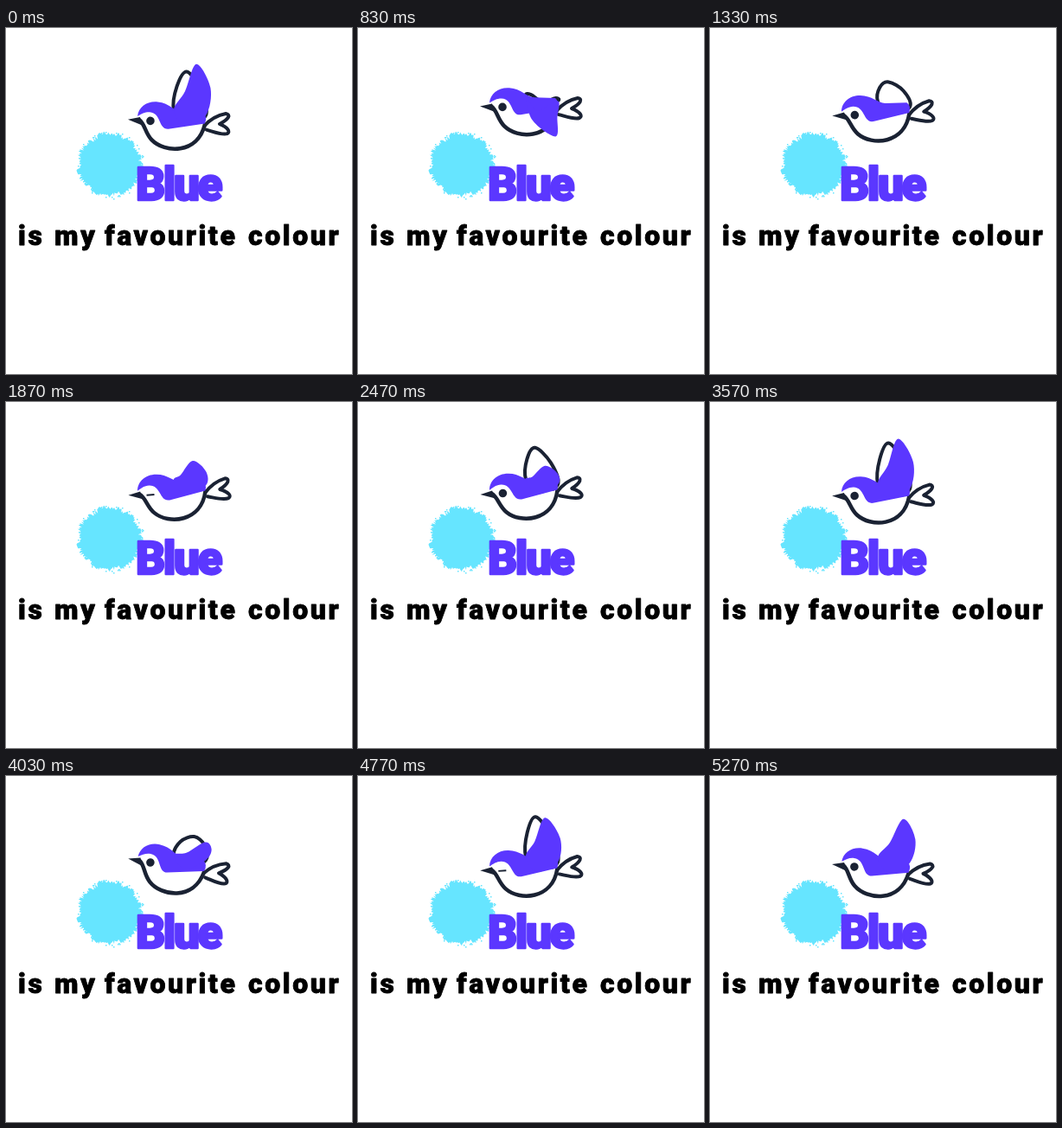
Recreate the animation shown at these times as an HTML page with a canvas. Size 400 px wide and 400 px high, loop 5.31 s.

```html
<!DOCTYPE html>
<html lang="en">
<head>
<meta charset="utf-8">
<title>Blue bird</title>
<style>
  html, body { margin: 0; width: 100%; height: 100%; overflow: hidden; background: #fff; }
  canvas { display: block; width: 400px; height: 400px; }
</style>
</head>
<body>
<canvas id="stage" width="400" height="400"></canvas>
<script>
const ctx = document.getElementById('stage').getContext('2d');
const LOOP = 5310, STEPS = 159, FLAPS = 9;
const PURPLE = '#5b37ff', DARK = '#1a2233', CYAN = '#66e5ff';
const TAU = Math.PI * 2;
const { sin, cos } = Math;

// Body parts around the pivot (200, 105)
const BELLY = new Path2D('M154 107C161 112 161 122 169 130C184 145 222 146 230 111');
const TAIL = new Path2D('M229 113C236 105 244 100 254 98C260 99 258 104 247 110C257 114 260 119 256 121C250 123 240 119 232 117');
const CAP = new Path2D('M152 103C153 92 163 85 175 86C189 87 195 97 204 97L228 98Q233 102 230 110L188 117C176 118 180 99 166 98C160 98 157 100 152 103Z');
const BEAK = new Path2D('M141 107L155 104L157 113Z');

// Smooth closed curve through the points
function blob(points) {
  const n = points.length, at = i => points[(i + n) % n];
  const path = new Path2D();
  path.moveTo(...at(0));
  for (let i = 0; i < n; i++) {
    const [a, b, c, d] = [at(i - 1), at(i), at(i + 1), at(i + 2)];
    path.bezierCurveTo(b[0] + (c[0] - a[0]) / 6, b[1] + (c[1] - a[1]) / 6,
      c[0] - (d[0] - b[0]) / 6, c[1] - (d[1] - b[1]) / 6, c[0], c[1]);
  }
  return path;
}

// A wing spans from fixed roots to its tip, with bulging sides
function wing(tip, left, right) {
  const a = [194, 95], b = [231, 101];
  const side = (root, [dx, dy]) => [(root[0] + tip[0]) / 2 + dx, (root[1] + tip[1]) / 2 + dy];
  return blob([a, side(a, left), tip, side(b, right), b, [207, 112]]);
}

function frontWing(phase) {
  const p = TAU * phase, u = p - 0.126;
  const beat = cos(u + 0.25 * sin(u)); // the downstroke is the quicker one
  const down = (1 - beat) / 2;
  const tip = [227 - 7 * cos(p) - 9 * sin(p), 95 - 54 * beat];
  return wing(tip, [-10 * down, 5], [11 * (1 - down), -2]);
}

function backWing(phase) {
  const p = TAU * phase;
  const tip = [214 - 5 * cos(p) - 8 * sin(p), 82 - 34 * cos(p - 0.38)];
  return wing(tip, [-4, -5], [5, -4]);
}

function fill(path, color) {
  ctx.fillStyle = color;
  ctx.fill(path);
}

function outline(path, width) {
  fill(path, '#fff');
  ctx.strokeStyle = DARK;
  ctx.lineWidth = width;
  ctx.stroke(path);
}

function makeSplat() {
  let seed = 7;
  const rnd = () => (seed = seed * 16807 % 2147483647) / 2147483647;
  const path = new Path2D();
  const count = 210;
  for (let i = 0; i < count; i++) {
    const a = i / count * TAU;
    const r = 35.5 + sin(a * 7 + 1) * 0.9 + sin(a * 13) * 0.8 + (rnd() - 0.5) * 5;
    path.lineTo(120 + cos(a) * r * 1.02, 158 + sin(a) * r);
  }
  path.closePath();
  for (let i = 0; i < 50; i++) {
    const a = rnd() * TAU, r = 35 + rnd() * 4;
    path.rect(Math.round(120 + cos(a) * r), Math.round(158 + sin(a) * r), 1.5, 1.5);
  }
  return path;
}
const SPLAT = makeSplat();

function heavyText(text, x, y, weight) {
  ctx.lineWidth = weight;
  ctx.fillText(text, x, y);
  ctx.strokeText(text, x, y);
}

function drawText() {
  ctx.font = '900 53px Roboto, "Liberation Sans", sans-serif';
  ctx.letterSpacing = '-2.4px';
  ctx.fillStyle = ctx.strokeStyle = PURPLE;
  heavyText('Blue', 150, 199, 2.4);

  ctx.font = '900 32px Roboto, "Liberation Sans", sans-serif';
  ctx.letterSpacing = '2.6px';
  ctx.fillStyle = ctx.strokeStyle = '#000';
  [['is', 14], ['my', 56], ['favourite', 114], ['colour', 280]]
    .forEach(([word, x]) => heavyText(word, x, 251, 0.8));
}

function drawEye(closed) {
  ctx.fillStyle = DARK;
  ctx.beginPath();
  if (closed) ctx.rect(162, 108, 9, 2);
  else ctx.arc(167, 108, 4.8, 0, TAU);
  ctx.fill();
}

function drawBird(flap) {
  const phase = flap % 1, p = TAU * phase;
  const part = flap % 5; // a blink and a tucked back wing every fifth flap
  const blink = part > 3 && part < 3.25;
  const tucked = part > 3.13 && part < 3.97;
  const lift = 9 * (cos(p) - 1);
  const tilt = 0.02 - 0.1 * sin(p) - 0.03 * sin(2 * p);

  ctx.save();
  ctx.translate(0, lift);
  if (!tucked) outline(backWing(phase), 4);

  ctx.save();
  ctx.translate(200, 105);
  ctx.rotate(tilt);
  ctx.translate(-200, -105);
  outline(TAIL, 4);
  outline(BELLY, 4.5);
  fill(CAP, PURPLE);
  fill(BEAK, DARK);
  drawEye(blink);
  ctx.restore();

  fill(frontWing(phase), PURPLE);
  ctx.restore();
}

function draw(now) {
  const t = now % LOOP;
  const step = Math.min(STEPS - 1, Math.floor((t + 3.4) * 3 / 100));
  ctx.fillStyle = '#fff';
  ctx.fillRect(0, 0, 400, 400);
  ctx.lineCap = ctx.lineJoin = 'round';
  fill(SPLAT, CYAN);
  drawText();
  drawBird(step * FLAPS / STEPS);
}

const start = performance.now();
function tick() {
  draw(performance.now() - start);
  requestAnimationFrame(tick);
}
tick();
</script>
</body>
</html>
```
